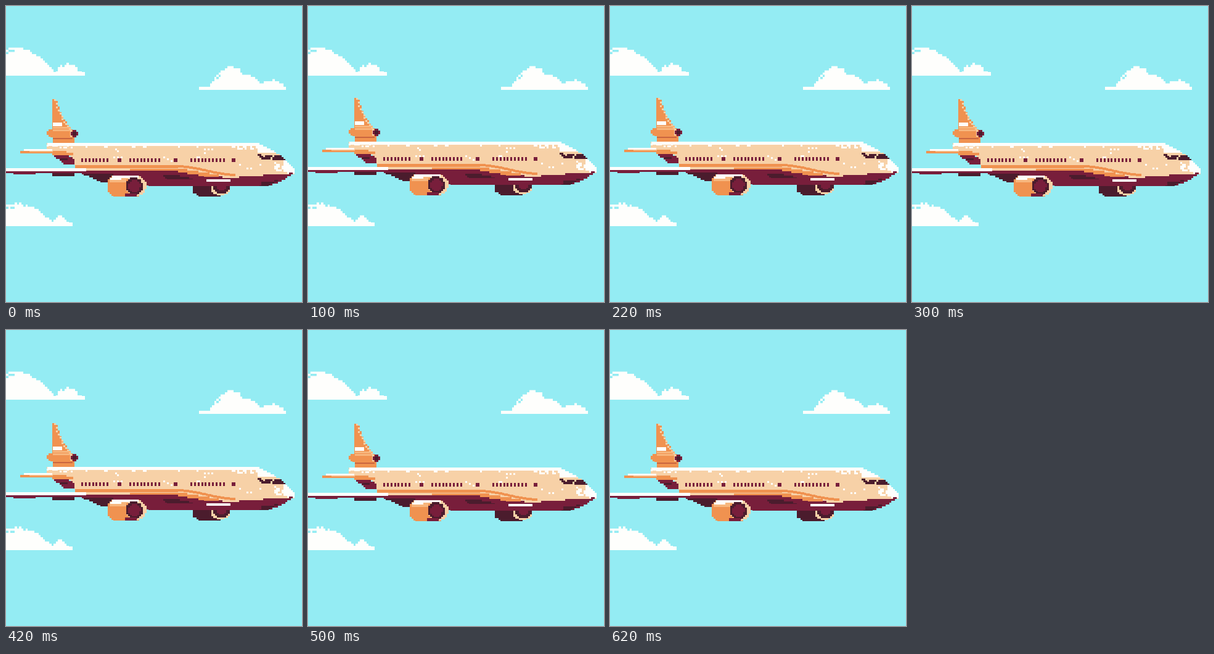
Animation, 480 px wide and 480 px high, one loop 0.7 s. Source, as an HTML page with a canvas:

```html
<!DOCTYPE html>
<html lang="en">
<head>
<meta charset="utf-8">
<title>Pixel plane</title>
<style>
  html, body { margin: 0; width: 100%; height: 100%; overflow: hidden; background: #94ecf3; }
  canvas { display: block; width: 480px; height: 480px; }
</style>
</head>
<body>
<canvas id="stage" width="480" height="480"></canvas>
<script>
const ctx = document.getElementById('stage').getContext('2d');
const CELL = 3, PUFF = 3.5, LOOP = 700;
const SKY = '#94ecf3', WHITE = '#fefefc', CREAM = '#f7d1a7', PEACH = '#f7b67d',
      ORANGE = '#f09250', RUST = '#c9653f', WINE = '#781e3b', DARK = '#4b1c2d';

let seed = 1;
function random() {
  seed = (seed * 16807) % 2147483647;
  return seed / 2147483647;
}

function rect(color, x, y, w, h) {
  ctx.fillStyle = color;
  ctx.fillRect(x, y, w, h);
}

// Fills a polygon in square cells; density < 1 scatters single cells.
function poly(color, pts, density = 1) {
  const ys = pts.map(p => p[1]);
  const top = Math.round(Math.min(...ys)), bottom = Math.round(Math.max(...ys));
  for (let y = top; y < bottom; y += CELL) {
    const h = Math.min(CELL, bottom - y), mid = y + h / 2;
    const hits = [];
    pts.forEach(([x1, y1], i) => {
      const [x2, y2] = pts[(i + 1) % pts.length];
      if ((y1 <= mid) !== (y2 <= mid)) hits.push(x1 + (mid - y1) / (y2 - y1) * (x2 - x1));
    });
    hits.sort((a, b) => a - b);
    for (let i = 0; i + 1 < hits.length; i += 2) {
      const a = Math.round(hits[i] / CELL) * CELL, b = Math.round(hits[i + 1] / CELL) * CELL;
      if (density === 1) rect(color, a, y, b - a, h);
      else for (let x = a; x < b; x += CELL) if (random() < density) rect(color, x, y, CELL, h);
    }
  }
}

function speckle(x, y, w, h, density) {
  poly(WHITE, [[x, y], [x + w, y], [x + w, y + h], [x, y + h]], density);
}

function disc(color, cx, cy, rx, ry = rx) {
  const pts = [];
  for (let a = 0; a < 2 * Math.PI; a += Math.PI / 12) {
    pts.push([cx + rx * Math.cos(a), cy + ry * Math.sin(a)]);
  }
  poly(color, pts);
}

// Points along a quadratic curve.
function curve(from, via, to) {
  const pts = [];
  for (let i = 0; i <= 10; i++) {
    const t = i / 10, s = 1 - t;
    pts.push([0, 1].map(k => s * s * from[k] + 2 * s * t * via[k] + t * t * to[k]));
  }
  return pts;
}

// Columns under parabolic lobes [centre, half width, height] with ragged tops.
function cloud(left, right, base, ledge, lobes) {
  const peak = lobes[0][0];
  for (let x = left; x < right; x += PUFF) {
    const dome = Math.max(...lobes.map(([cx, w, h]) => h * (1 - ((x + PUFF / 2 - cx) / w) ** 2)));
    const rows = Math.round(dome / PUFF + random() - .5);
    const top = base - Math.max(ledge, rows * PUFF);
    const x0 = Math.round(x), w = Math.min(right, Math.round(x + PUFF)) - x0;
    rect(WHITE, x0, top, w, base - top);
    if (x < peak && rows > 5 && random() < .5) rect(SKY, x0, top + PUFF, w, PUFF);
  }
}

function clouds() {
  seed = 11;
  cloud(0, 128, 113, 6, [[12, 72, 46], [100, 24, 19]]);
  cloud(313, 454, 136, 5, [[364, 36, 37], [390, 28, 26], [430, 24, 16]]);
  cloud(0, 108, 357, 6, [[14, 68, 36], [89, 17, 16]]);
}

function tail() {
  const edge = curve([82, 151], [90, 182], [105, 197]);
  poly(ORANGE, [[76, 151], ...edge, [105, 201], [76, 201]]);
  for (const [x, y] of edge) rect(CREAM, Math.round(x / CELL) * CELL - CELL, Math.round(y), CELL, CELL);
  rect(WHITE, 76, 189, 15, 6);
  rect(PEACH, 76, 196, 29, 3);

  poly(ORANGE, [[72, 200], [108, 200], [108, 213], [72, 213], [67, 210], [67, 203]]);
  rect(PEACH, 76, 200, 30, 3);
  rect(ORANGE, 76, 213, 35, 9);
  rect(RUST, 76, 214, 32, 2);
  rect(CREAM, 104, 201, 3, 11);
  disc(WINE, 111, 207, 6);
  rect(DARK, 108, 204, 6, 6);
}

function tailplane() {
  rect(WHITE, 29, 232, 46, 3);
  rect(ORANGE, 23, 235, 75, 4);
  rect(PEACH, 38, 235, 38, 2);
  rect(ORANGE, 75, 238, 34, 4);
  poly(WINE, [[76, 242], [98, 242], [111, 248], [112, 257], [96, 257], [86, 249]]);
  rect(DARK, 88, 247, 12, 3);
}

function fuselage() {
  const nose = curve([405, 222], [440, 232], [468, 266]);
  poly(CREAM, [[67, 222], ...nose, [468, 272], [370, 280], [126, 268], [111, 257], [108, 246], [96, 242], [67, 234]]);
  rect(WHITE, 67, 222, 338, 5);
  poly(WHITE, [...nose.slice(0, 6), [408, 238]]);
  poly(WHITE, [...nose.slice(7), [468, 272], [450, 270]]);
  seed = 83;
  speckle(67, 225, 40, 6, .3);
  speckle(110, 227, 250, 3, .1);
  speckle(125, 231, 230, 12, .015);
  speckle(360, 227, 42, 6, .4);
  speckle(375, 250, 60, 18, .05);
  speckle(435, 253, 18, 15, .5);
}

function windows() {
  for (const [x, n] of [[122, 8], [200, 9], [299, 10]]) {
    for (let i = 0; i < n; i++) rect(WINE, Math.round(x + i * 5.85), 247, 3, 6);
  }
  for (const x of [181, 272, 366]) rect(WINE, x, 247, 6, 6);
  speckle(122, 244, 240, 3, .08);
  speckle(254, 247, 15, 6, .2);

  poly(DARK, [[408, 240], [414, 240], [420, 249], [414, 249]]);
  poly(DARK, [[420, 242], [432, 242], [429, 249], [417, 249]]);
  poly(DARK, [[435, 242], [447, 242], [453, 250], [432, 250]]);
}

function belly() {
  poly(WINE, [[112, 267], [270, 267], [330, 277], [370, 278], [466, 271], [444, 286], [424, 292],
    [230, 292], [222, 283], [130, 274]]);
  poly(DARK, [[124, 272], [190, 274], [166, 286], [154, 286]]);
  poly(DARK, [[254, 274], [290, 276], [305, 281], [260, 281]]);
  poly(DARK, [[415, 286], [445, 282], [424, 292], [412, 292]]);
  rect(WHITE, 325, 281, 39, 4);
}

function stripes() {
  rect(ORANGE, 112, 258, 167, 5);
  poly(ORANGE, [[200, 264], [286, 264], [345, 274], [345, 277], [325, 277], [270, 267], [200, 267]]);
  for (let x = 276; x < 372; x += CELL) {
    const t = (x - 276) / 96;
    rect(ORANGE, x, Math.round(258 + 14 * t * t * (3 - 2 * t)), CELL, 4);
  }
}

function wing() {
  rect(WHITE, 0, 263, 130, 5);
  rect(WINE, 0, 268, 130, 3);
  rect(WINE, 12, 271, 36, 2);
  rect(DARK, 75, 271, 36, 5);
}

function farEngine() {
  poly(DARK, [[302, 289], [350, 289], [347, 309], [314, 309], [302, 302]]);
  disc(CREAM, 348, 294, 16, 13);
  disc(DARK, 350, 292, 14, 12);
  disc(WINE, 350, 292, 8, 7);
}

function nearEngine() {
  poly(ORANGE, [[173, 275], [215, 275], [215, 309], [175, 309], [164, 299], [164, 284]]);
  poly(PEACH, [[170, 278], [198, 278], [193, 286], [167, 286]]);
  disc(CREAM, 211, 292, 17, 16);
  rect(WHITE, 172, 275, 43, 4);
  rect(WHITE, 169, 279, 18, 3);
  disc(DARK, 208, 292, 14);
  disc(WINE, 208, 292, 10);
  rect(WINE, 193, 304, 19, 5);
}

function bob(t) {
  if (t < 100) return 0;
  if (t < 300) return -2;
  return t < 500 ? 0 : 1;
}

function draw(t) {
  rect(SKY, 0, 0, 480, 480);
  clouds();
  ctx.save();
  ctx.translate(0, bob(t));
  tail();
  fuselage();
  tailplane();
  windows();
  farEngine();
  belly();
  stripes();
  wing();
  nearEngine();
  ctx.restore();
}

const start = performance.now();
function tick() {
  draw((performance.now() - start) % LOOP);
  requestAnimationFrame(tick);
}
tick();
</script>
</body>
</html>
```
